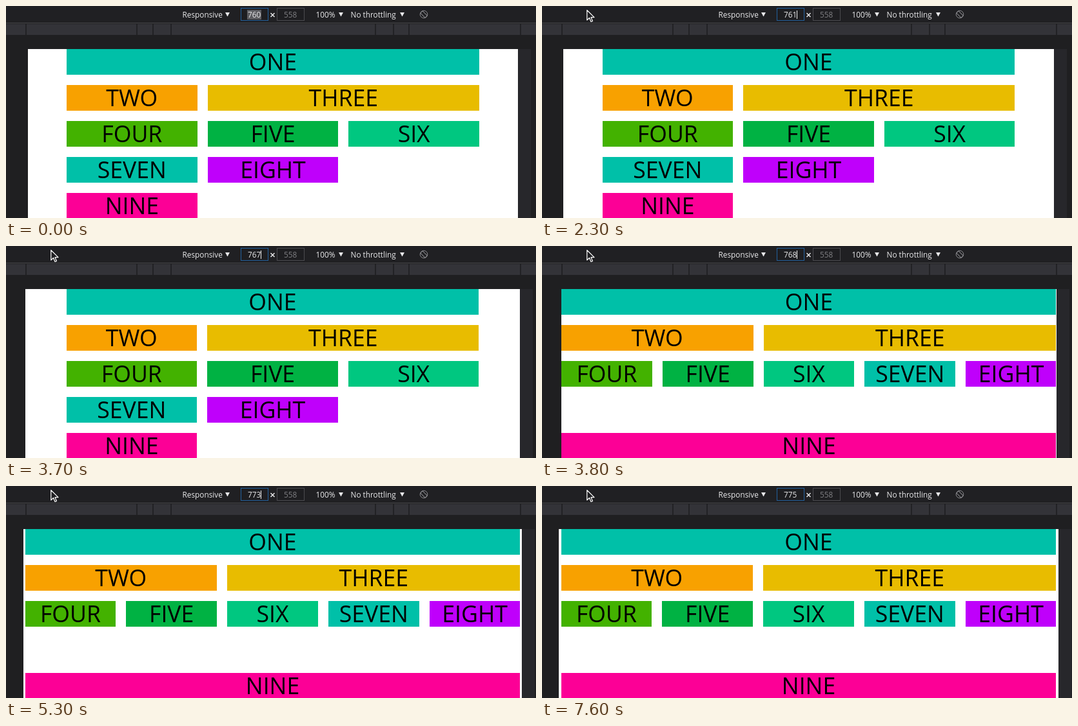
Write an HTML page that moves like this. It is 822 px wide and 330 px high and loops after 8000 ms.

```html
<!DOCTYPE html>
<html lang="en">
<head>
<meta charset="utf-8">
<title>Responsive grid</title>
<style>
  html, body { margin: 0; width: 100%; height: 100%; overflow: hidden; background: #1f1f21; }
  svg { display: block; width: 822px; height: 330px; }
  text { font-family: "Open Sans", "Noto Sans", sans-serif; font-size: 11.8px; fill: #e8e8ea; }
  .label { font-size: 35.6px; fill: #000; text-anchor: middle; }
  rect { shape-rendering: crispEdges; }
</style>
</head>
<body>
<svg id="stage" viewBox="0 0 822 330"></svg>
<script>
const LOOP = 8000, CENTER = 414, GAP = 16, ROW = 56, TOP = 67;
const stage = document.getElementById('stage');

function add(tag, attrs, text) {
  const el = document.createElementNS('http://www.w3.org/2000/svg', tag);
  set(el, attrs);
  if (text) el.textContent = text;
  return stage.appendChild(el);
}
function set(el, attrs) {
  for (const key in attrs) el.setAttribute(key, attrs[key]);
}
const box = (x, y, width, height, fill) => add('rect', { x, y, width, height, fill });
const show = (el, on) => set(el, { visibility: on ? 'visible' : 'hidden' });

// Cells: [column, row, span]
const cells = [
  ['ONE', '#00c0a8', [0, 0, 3], [0, 0, 5]],
  ['TWO', '#f8a100', [0, 1, 1], [0, 1, 2]],
  ['THREE', '#e8bc00', [1, 1, 2], [2, 1, 3]],
  ['FOUR', '#43b200', [0, 2, 1], [0, 2, 1]],
  ['FIVE', '#00b243', [1, 2, 1], [1, 2, 1]],
  ['SIX', '#00c780', [2, 2, 1], [2, 2, 1]],
  ['SEVEN', '#00c0a8', [0, 3, 1], [3, 2, 1]],
  ['EIGHT', '#bf00fb', [1, 3, 1], [4, 2, 1]],
  ['NINE', '#fc0096', [0, 4, 1], [0, 4, 5]]
];

// Steps: [time, value]
const widths = [[0, 760], [2300, 761], [2600, 762], [2700, 763], [2900, 764], [3400, 766],
  [3700, 767], [3800, 768], [4000, 769], [4400, 770], [5300, 773], [5600, 774], [5800, 775]];
const carets = [[0, false], [2300, true], [6700, false], [7000, true], [7600, false]];
const pointers = [[0, null], [100, [57, 9]], [300, [59, 15]], [400, [64, 13]],
  [500, [68, 9]], [600, [69, 5.5]]];

function valueAt(steps, t) {
  let value;
  for (const [start, v] of steps) if (t >= start) value = v;
  return value;
}

// Toolbar
box(0, 0, 822, 26, '#202023');
box(0, 26, 822, 1, '#4a4a4d');
box(0, 28, 822, 17, '#333338');
for (const x of [30, 202, 227, 255, 572, 600, 624, 797]) box(x, 28, 2, 17, '#222225');

const tool = (x, text, fill = '#e8e8ea') => add('text', { x, y: 18, fill, style: `fill:${fill}` }, text);
const arrow = x => add('path', { d: `M${x} 10h7l-3.5 6.5z`, fill: '#e8e8ea' });
tool(273.5, 'Responsive');
arrow(340);
tool(480.5, '100%');
arrow(516);
tool(534.5, 'No throttling');
arrow(611);

const field = (x, stroke) => add('rect',
  { x: x + .5, y: 3.5, width: 42, height: 19, fill: '#1e1e21', stroke });
field(364, '#22609c');
field(420, '#4b4b4f');
const selection = box(374, 6, 22, 15, '#5c5c60');
const widthText = tool(375, '760');
const caret = box(395, 7, 1, 13, '#f0f0f0');
tool(431, '558', '#808084');
add('path', { d: 'M410.5 11l6 6m0-6l-6 6', stroke: '#e8e8ea', 'stroke-width': 1.5 });
add('circle', { cx: 648, cy: 13, r: 5.8, fill: 'none', stroke: '#88888c' });
add('rect', { x: 645.7, y: 7.8, width: 4.6, height: 10.4, rx: 1, fill: '#202023', stroke: '#88888c',
  transform: 'rotate(-45 648 13)', style: 'shape-rendering:auto' });

// Page
const handle = box(0, TOP, 20, 263, '#27272b');
const page = box(0, TOP, 0, 263, '#fff');
const bars = cells.map(([name, color, narrow, wide]) => ({
  narrow, wide,
  rect: box(0, 0, 0, 40, color),
  label: add('text', { class: 'label' }, name)
}));

const pointer = add('path', {
  d: 'M.8 1V16.5L4.5 13 7 19 9.5 18 7 12.2H12Z',
  fill: '#202023', stroke: '#fff', 'stroke-width': 1.2, 'stroke-linejoin': 'round'
});

function layout(width) {
  const pageLeft = Math.floor(CENTER - width / 2);
  const pageRight = pageLeft + width;
  set(page, { x: pageLeft, width });
  set(handle, { x: pageRight });

  const isWide = width >= 768;
  const columns = isWide ? 5 : 3;
  const container = isWide ? 768 : 640;
  const column = (container - GAP * (columns - 1)) / columns;
  const origin = CENTER - container / 2 - (width % 2) / 2;

  for (const { narrow, wide, rect, label } of bars) {
    const [col, row, span] = isWide ? wide : narrow;
    const left = origin + col * (column + GAP);
    const size = span * (column + GAP) - GAP;
    const x = Math.floor(left + .5);
    const right = Math.min(Math.ceil(left + size - .5), pageRight - 1);
    const y = TOP + row * ROW;
    set(rect, { x, y, width: right - x });
    set(label, { x: left + size / 2, y: y + 33 });
  }
}

function render(t) {
  const width = valueAt(widths, t);
  layout(width);
  widthText.textContent = width;
  show(selection, width === 760);
  show(caret, valueAt(carets, t));
  const spot = valueAt(pointers, t);
  show(pointer, spot);
  if (spot) set(pointer, { transform: `translate(${spot})` });
}

const begin = performance.now();
function tick() {
  render((performance.now() - begin) % LOOP);
  requestAnimationFrame(tick);
}
tick();
</script>
</body>
</html>
```
